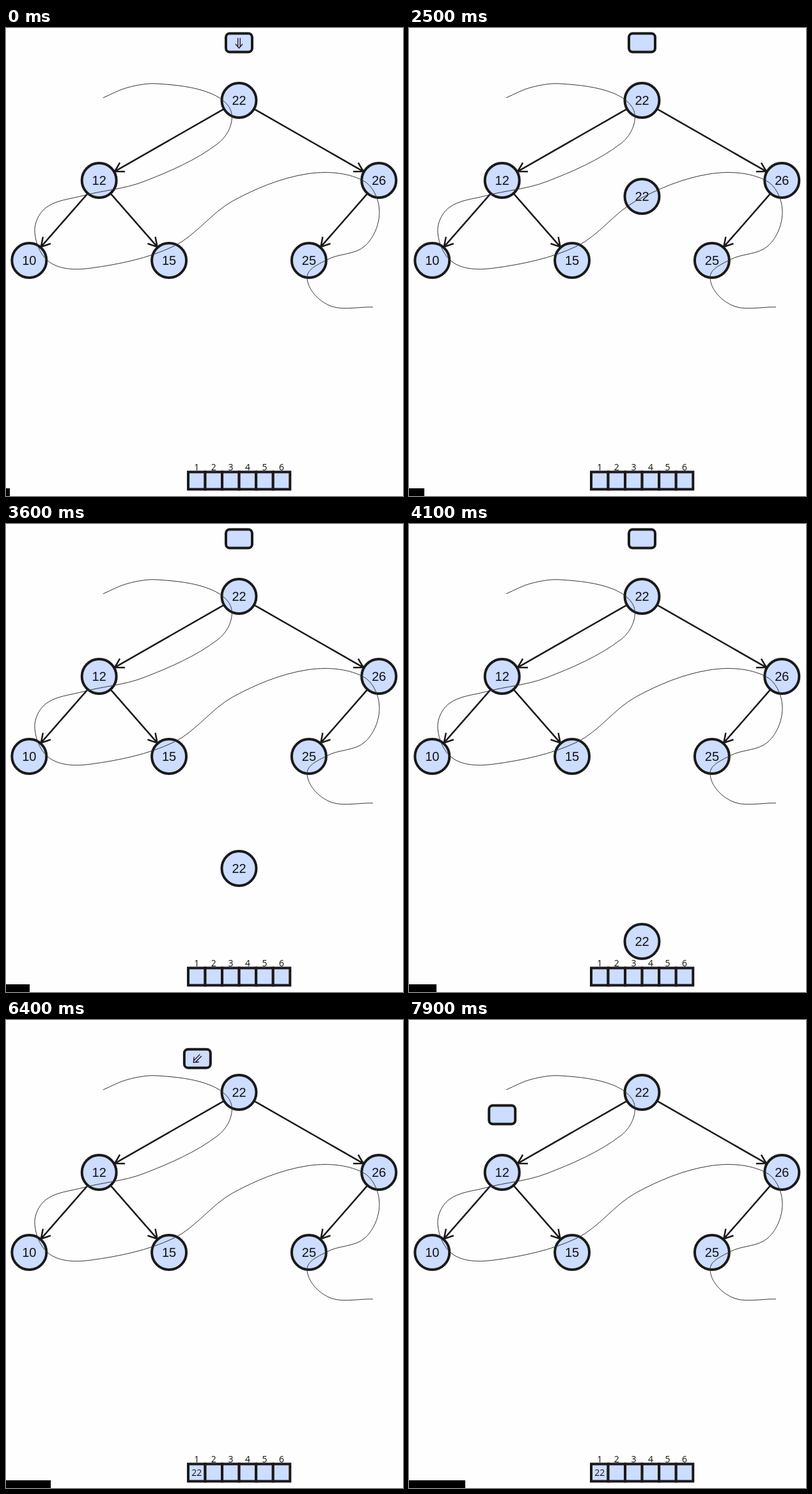
An HTML page for the animation above (8000 ms loop, 621 by 731 pixels).

```html
<!DOCTYPE html>
<html lang="en">
<head>
<meta charset="utf-8">
<title>Preorder traversal</title>
<style>
  html, body { margin: 0; width: 100%; height: 100%; overflow: hidden; background: #fefefe; }
  svg { display: block; width: 621px; height: 731px; }
  .shape { fill: #ccddff; stroke: #1a1a1a; stroke-width: 4; }
  .edge { fill: none; stroke: #1a1a1a; stroke-width: 2.5; }
  .trail { fill: none; stroke: #333; stroke-width: 1; }
  .arrow { fill: none; stroke: #200c12; stroke-width: 1.3; }
  text { text-anchor: middle; fill: #111; }
  .label { font: 20px "Liberation Sans", Arial, sans-serif; }
  .small { font: 14px "Open Sans", "Noto Sans", sans-serif; }
</style>
</head>
<body>
<svg viewBox="0 0 621 731">
  <g id="edges"></g>
  <g id="nodes"></g>
  <g id="clone"></g>
  <g id="pointer">
    <rect class="shape" x="-20.5" y="-14.5" width="41" height="29" rx="6"/>
    <path id="arrow" class="arrow" d="M-1.8-7.5V6M1.8-7.5V6M-5.5 2L0 8.5L5.5 2"/>
  </g>
  <path id="trail" class="trail"/>
  <g id="cells"></g>
  <text id="stored" class="small" x="298.3" y="711.5">22</text>
  <rect id="progress" y="719" height="12"/>
</svg>
<script>
const LOOP = 8000, STEP = 100, SPEED = 0.25;
const $ = id => document.getElementById(id);

function add(parent, tag, attrs, text = "") {
  const el = document.createElementNS("http://www.w3.org/2000/svg", tag);
  for (const key in attrs) el.setAttribute(key, attrs[key]);
  el.textContent = text;
  parent.append(el);
}

// Position of a node in a three-level binary tree, by heap index
function nodeAt(index) {
  const depth = Math.floor(Math.log2(index + 1));
  const slot = index + 1 - 2 ** depth;
  const column = (slot + 0.5) * 2 ** (3 - depth) - 1;
  return [36.3 + 109.4 * column, 113 + 125 * depth];
}

function addNode(parent, [x, y], value) {
  add(parent, "circle", { class: "shape", cx: x, cy: y, r: 27 });
  add(parent, "text", { class: "label", x, y: y + 7 }, value);
}

function addEdge([x1, y1], [x2, y2]) {
  const angle = Math.atan2(y2 - y1, x2 - x1);
  const dx = 28 * Math.cos(angle), dy = 28 * Math.sin(angle);
  const tip = [x2 - dx, y2 - dy];
  const arm = turn => [
    tip[0] - 16 * Math.cos(angle + turn),
    tip[1] - 16 * Math.sin(angle + turn)
  ];
  const d = `M${x1 + dx} ${y1 + dy}L${tip}M${arm(Math.PI / 6)}L${tip}L${arm(-Math.PI / 6)}`;
  add($("edges"), "path", { class: "edge", d });
}

// Smooth curve through key points, with handles a third of each segment long
function smoothPath(points) {
  const handle = (i, length) => {
    const [x, y] = points[i];
    const [x1, y1] = points[i - 1] || points[i];
    const [x2, y2] = points[i + 1] || points[i];
    const scale = length / Math.hypot(x2 - x1, y2 - y1);
    return [x + (x2 - x1) * scale, y + (y2 - y1) * scale];
  };
  let d = "M" + points[0];
  for (let i = 1; i < points.length; i++) {
    const [a, b] = [points[i - 1], points[i]];
    const third = Math.hypot(b[0] - a[0], b[1] - a[1]) / 3;
    d += `C${handle(i - 1, third)} ${handle(i, -third)} ${b}`;
  }
  return d;
}

[22, 12, 26, 10, 15, 25].forEach((value, i) => {
  addNode($("nodes"), nodeAt(i), value);
  if (i) addEdge(nodeAt((i - 1) >> 1), nodeAt(i));
});
addNode($("clone"), [0, 0], 22);

for (let i = 0; i < 6; i++) {
  const x = 285 + i * 26.55;
  add($("cells"), "rect", { class: "shape", x, y: 693.5, width: 26.55, height: 27 });
  add($("cells"), "text", { class: "small", x: x + 13.3, y: 691 }, i + 1);
}

$("trail").setAttribute("d", smoothPath([
  [152, 109], [190, 93], [237, 87], [320, 102], [353, 134], [332, 180], [215, 240],
  [120, 262], [62, 281], [45, 320], [70, 367], [133, 375], [262, 341], [355, 270],
  [470, 228], [558, 238], [584, 285], [562, 340], [502, 362], [471, 390],
  [505, 433], [574, 436]
]));

const show = (id, visible) => $(id).setAttribute("visibility", visible ? "visible" : "hidden");

// Moves an element along a straight line at constant speed
function travel(id, t, start, [x1, y1], [x2, y2]) {
  const duration = Math.hypot(x2 - x1, y2 - y1) / SPEED;
  const p = Math.min(1, Math.max(0, (t - start) / duration));
  $(id).setAttribute("transform", `translate(${x1 + (x2 - x1) * p} ${y1 + (y2 - y1) * p})`);
}

function draw(t) {
  const [rootX, rootY] = nodeAt(0), [leftX, leftY] = nodeAt(1);

  travel("clone", t, 1900, [rootX, rootY], [rootX, 652]);
  show("clone", t >= 1800 && t < 4200);
  show("stored", t >= 4200);

  travel("pointer", t, 6100, [rootX, rootY - 90], [leftX, leftY - 90]);
  $("arrow").setAttribute("transform", `rotate(${t < 1000 ? 0 : 45})`);
  show("arrow", t < 1000 || (t >= 5100 && t < 7200));

  const tick = Math.max(0, t / STEP - 9);
  $("progress").setAttribute("width", Math.floor(6.05 + 1.175 * tick));
}

const origin = performance.now();
function frame() {
  const t = (performance.now() - origin) % LOOP;
  draw(Math.floor(t / STEP) * STEP);
  requestAnimationFrame(frame);
}
frame();
</script>
</body>
</html>
```
